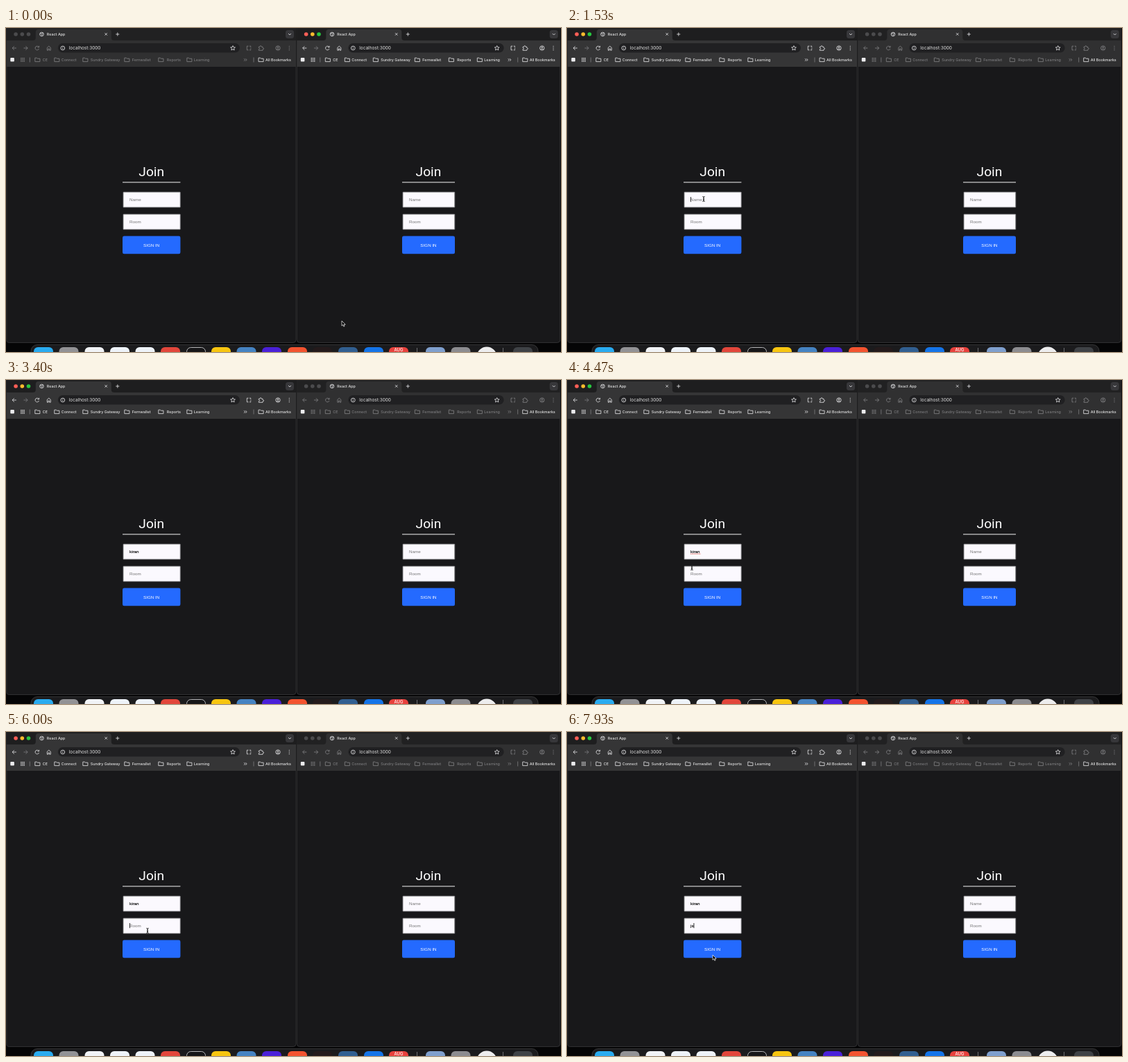
An HTML page for the animation above (8000 ms loop, 800 by 468 pixels).

```html
<!DOCTYPE html>
<html lang="en">
<head>
<meta charset="utf-8">
<title>Join</title>
<style>
html, body { margin: 0; width: 100%; height: 100%; overflow: hidden; background: #050506; }
svg { display: block; width: 800px; height: 468px; }
text { font: 500 5.4px Inter, Roboto, sans-serif; fill: #e3e3e3; }
.line { fill: none; stroke: #d6d6d8; stroke-width: .9; }
.faint { stroke: #77777a; }
.dim text { fill: #7b7b7d; }
.dim .line { stroke: #7b7b7d; }
.dim .fill { fill: #7b7b7d; }
.fill { fill: #d6d6d8; }
.strip { fill: #1e1e1f; }
.bar { fill: #353536; }
.idle .strip { fill: #212122; }
.idle .bar { fill: #303031; }
.idle .light { fill: #4b4b4d; }
text.url { font-size: 6.45px; font-weight: 400; }
text.head { font: 400 19.2px Roboto, sans-serif; fill: #fff; text-anchor: middle; }
text.field { font: 6.26px "Liberation Sans", Arial, sans-serif; fill: #757575; }
text.typed { fill: #000; stroke: #000; stroke-width: .12; }
text.button { font: 6.26px "Liberation Sans", Arial, sans-serif; fill: #fff; text-anchor: middle; }
</style>
</head>
<body>
<svg id="stage" viewBox="0 0 800 468"></svg>
<script>
const LOOP = 8000, NAME = "kiran", ROOM = "js";
const $ = id => document.getElementById(id);
const rect = (x, y, w, h, r, attrs) =>
  `<rect x="${x}" y="${y}" width="${w}" height="${h}" rx="${r}" ${attrs}/>`;
const circle = (x, y, r, attrs) => `<circle cx="${x}" cy="${y}" r="${r}" ${attrs}/>`;
const label = (x, y, s, attrs = "") => `<text x="${x}" y="${y}" ${attrs}>${s}</text>`;
const line = (d, extra = "") => `<path class="line ${extra}" d="${d}"/>`;
const folder = x => line(`M${x} 43.2h2.6l.9 1h3.6v4.4h-7.1z`);
const globe = x =>
  circle(x, 9, 2.8, 'class="line"') + line(`M${x - 2.5} 8h2.2l1 1.5-1 2M${x + 2.4} 7.6h-1.8`);

function topBar(left, right) {
  const x = n => left + n, r = n => right + n;
  const marks = [[41, 52, "CE"], [69, 79, "Connect"], [110, 121, "Sundry Gateway"],
    [170, 181, "Fernwallet"], [219, 231, "Reports"], [260, 270, "Learning"]];
  const lights = ["#ff5f57", "#febc2e", "#28c840"];
  return rect(left, -4, r(418) - left, 30, 4, 'class="strip"')
    + `<path class="bar" d="M${left} 18H${x(38)}q4 0 4-4V6q0-4 4-4H${x(147)}q4 0 4 4V14q0 4 4 4H${r(418)}V56H${left}z"/>`
    + lights.map((c, i) => circle(x(13.3 + i * 9.2), 9, 2.8, `class="light" fill="${c}"`)).join("")
    + globe(x(50.7)) + label(x(58), 11, "React App")
    + line(`M${x(141.7)} 7.2l3.4 3.4m0-3.4l-3.4 3.4M${x(157.5)} 9h5m-2.5-2.5v5`)
    + rect(r(403), 3, 12, 12, 3.5, 'fill="#37373a"') + line(`M${r(407)} 8l2 2 2-2`)
    // toolbar
    + rect(x(74), 22, r(337) - x(74), 13.6, 6.8, 'fill="#202022"')
    + circle(x(81), 29, 2.9, 'class="line"') + line(`M${x(81)} 28.6v2M${x(81)} 27v.8`)
    + label(x(90), 31.2, "localhost:3000", 'class="url"')
    + line(`M${r(327)} 25.6l1 2.2 2.4.2-1.8 1.6.5 2.4-2.1-1.3-2.1 1.3.5-2.4-1.8-1.6 2.4-.2z`)
    + `<g class="chrome">`
    + line(`M${x(14)} 29h-5.6m2.6-2.7l-2.7 2.7 2.7 2.7`)
    + line(`M${x(24.7)} 29h5.6m-2.6-2.7l2.7 2.7-2.7 2.7`, "faint")
    + line(`M${x(46.5)} 27.6a2.8 2.8 0 1 0 .2 2.4M${x(46.8)} 25.8v2.1h-2.2`)
    + line(`M${x(58.5)} 28.4l2.5-2.2 2.5 2.2v3.8h-1.7v-2.2h-1.6v2.2h-1.7z`)
    + line(`M${r(349.5)} 26.2h-2.2v5.6h2.2M${r(351)} 26.2h1.8v1.4m0 1v1.2m0 .8v1.2h-1.8`)
    + line(`M${r(364.3)} 27.2h1.6q.2-1.6 1.2-1.6t1.2 1.6h1.7v1.5q1.6.1 1.6 1.1t-1.6 1.2v1.3h-5.7v-1.5q1.4-.3 1.4-1.1t-1.4-1.1z`)
    + circle(r(392), 29, 3.2, 'class="line"') + circle(r(392), 28, 1, 'class="line"')
    + line(`M${r(390)} 31q2-1.6 4 0`)
    + [26.3, 29, 31.7].map(y => circle(r(408.3), y, .65, 'class="fill"')).join("")
    // bookmarks
    + [0, 1, 2].map(i => [0, 1, 2].map(j => rect(x(20.3 + i * 2.2), 43 + j * 2.2, 1.4, 1.4, 0, 'class="fill"')).join("")).join("")
    + marks.map(([f, t, s]) => folder(x(f)) + label(x(t), 47.8, s)).join("")
    + line(`M${r(343)} 44.2l1.8 1.8-1.8 1.8m2.4-3.6l1.8 1.8-1.8 1.8`)
    + `</g>`
    + rect(x(5.5), 43, 5.6, 5.6, 1, 'fill="#ececee"')
    + line(`M${x(33.5)} 42.5v7M${r(357)} 42.5v7`, "faint")
    + folder(r(364)) + label(r(374), 47.8, "All Bookmarks");
}

function form(x, w, id) {
  const mid = x + w / 2;
  const input = (y, hint, key) => rect(x + 1, y, w - 1.2, 22, .5, 'fill="#fbf9fe" stroke="#77777a" stroke-width=".9"')
    + label(x + 10, y + 12.5, hint, `class="field" id="${id + key}"`);
  return label(mid, 214.4, "Join", 'class="head"')
    + rect(x, 222.4, w, 1, 0, 'fill="#f4f4f4"')
    + input(237, "Name", "Name") + input(269, "Room", "Room")
    + rect(x, 300.6, w, 25.6, 2.3, 'fill="#246aff"')
    + label(mid, 315.5, "SIGN IN", 'class="button"');
}

function browser(id, left, right, formX, formW) {
  const w = right + 418 - left;
  return `<g id="${id}">` + rect(left, -5, w, 459.5, 4, 'fill="#18181a" stroke="#39393b" stroke-width=".8"')
    + topBar(left, right) + form(formX, formW, id) + `</g>`;
}

function dock() {
  const icons = [[54, "#29abf0"], [90.5, "#929295"], [127.5, "#f1f3f6"], [164, "#eef3f9"],
    [200.5, "#eef3f9"], [237, "#e2463b"], [274, "#161618"], [310, "#f7c510"], [346.5, "#4583c2"],
    [383, "#4a20d8"], [420, "#f3532f"], [456, "#241a1b"], [493, "#315f91"], [530, "#1474e8"],
    [566, "#e8413c"], [619, "#7f9fcd"], [655.5, "#8c8c90"], [745, "#3f4246"]];
  return rect(36, 457.5, 731, 30, 9, 'fill="#1b1b1d" stroke="#454547" stroke-width=".7"')
    + icons.map(([x, c]) => rect(x - 14, 461, 28, 28, 6, `fill="${c}"`)).join("")
    + rect(260.5, 461.5, 27, 27, 6, 'fill="none" stroke="#c9c9cb" stroke-width=".9"')
    + circle(693, 475, 14.5, 'fill="#ededee"')
    + label(566, 467.3, "AUG", 'text-anchor="middle" style="font-size:6px;fill:#fff"')
    + line("M592.5 462v6M716.5 462v6", "faint");
}

$("stage").innerHTML = rect(0, 0, 800, 468, 0, 'fill="#050506"')
  + browser("l", .8, 0, 168, 83.4) + browser("r", 419.3, 380.7, 571, 76) + dock()
  + `<path id="spell" d="M178 251.2h15" stroke="#e3392f" stroke-width=".8" stroke-dasharray="1 .5"/>`
  + `<rect id="caret" width=".8" height="7.2"/>`
  + `<path id="arrow" d="M0 0v7.2l1.7-1.5 1.1 2.5 1.2-.5-1.1-2.4h2.3z" fill="#000" stroke="#fff" stroke-width=".7"/>`
  + `<path id="beam" d="M-1.7-3.6q1.7 0 1.7 1v5.2q0 1-1.7 1M1.7-3.6q-1.7 0-1.7 1v5.2q0 1 1.7 1M-.9 1.4h1.8" fill="none" stroke="#222" stroke-width=".9"/>`;

// pointer stops: time, x, y
const path = [[0, 484, 423], [70, 484, 423], [760, 198, 241], [930, 198, 241], [1200, 197, 247],
  [3730, 197, 247], [4400, 180, 271], [4600, 180, 271], [4900, 182, 279], [5470, 204, 287],
  [7470, 204, 287], [7900, 210, 322], [LOOP, 210, 322]];
const nameKeys = [2070, 2270, 2470, 2600, 2730], roomKeys = [6530, 6800];
const clickName = 1200, clickRoom = 4900;

function pointer(t) {
  const i = path.findIndex(p => p[0] > t), [t0, x0, y0] = path[i - 1], [t1, x1, y1] = path[i];
  const u = (t - t0) / (t1 - t0), e = u * u * (3 - 2 * u);
  return [x0 + (x1 - x0) * e, y0 + (y1 - y0) * e];
}

const show = (id, on) => $(id).setAttribute("visibility", on ? "visible" : "hidden");

function type(id, word, hint, keys, t) {
  const n = keys.filter(k => k <= t).length, el = $(id);
  el.textContent = n ? word.slice(0, n) : hint;
  el.classList.toggle("typed", n > 0);
  return n ? el.getComputedTextLength() : 0;
}

function focus(t) {
  const leftOn = t >= 670;
  for (const [id, on] of [["l", leftOn], ["r", !leftOn]]) {
    $(id).classList.toggle("idle", !on);
    $(id).querySelector(".chrome").classList.toggle("dim", !on);
  }
}

function draw(t) {
  focus(t);
  const nameW = type("lName", NAME, "Name", nameKeys, t);
  const roomW = type("lRoom", ROOM, "Room", roomKeys, t);
  const inRoom = t >= clickRoom;
  const last = Math.max(...[clickName, clickRoom, ...nameKeys, ...roomKeys].filter(k => k <= t));
  show("caret", t >= clickName && (t - last) % 1000 < 500);
  $("caret").setAttribute("x", 178 + (inRoom ? roomW : nameW));
  $("caret").setAttribute("y", inRoom ? 276 : 244);
  show("spell", t >= 4000 && !inRoom);

  const [x, y] = pointer(t);
  const hidden = (t >= 2070 && t < 3730) || (t >= 6530 && t < 7470);
  const overField = t > 860 && ((y > 237 && y < 259) || (y > 269 && y < 291));
  for (const id of ["arrow", "beam"]) {
    $(id).setAttribute("transform", `translate(${x} ${y})`);
    show(id, !hidden && overField === (id === "beam"));
  }
}

const start = performance.now();
function frame() {
  draw((performance.now() - start) % LOOP);
  requestAnimationFrame(frame);
}
frame();
</script>
</body>
</html>
```
